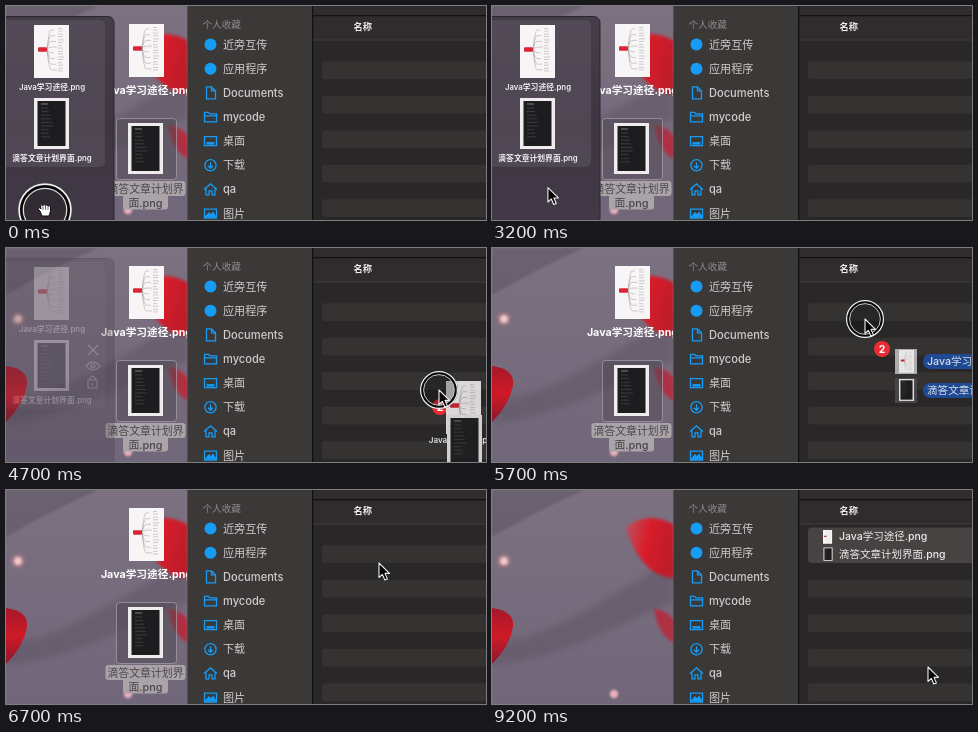
An HTML page for the animation above (9600 ms loop, 480 px wide and 214 px high).

```html
<!DOCTYPE html>
<html lang="zh-CN">
<head>
<meta charset="utf-8">
<title>Drag files into a folder</title>
<style>
html, body { margin: 0; width: 100%; height: 100%; overflow: hidden; background: #292727; }
svg { display: block; width: 480px; height: 214px; }
text { font-family: Inter, "Noto Sans CJK SC", "Noto Sans CJK", sans-serif; }
</style>
</head>
<body>
<svg id="stage" viewBox="0 0 480 214" xmlns="http://www.w3.org/2000/svg"></svg>
<script>
const LOOP = 9600, STEP = 100;
const FILE_A = 'Java学习途径.png', FILE_B = '滴答文章计划界面.png';
const BLUE = '#179cf5';

const rect = (x, y, w, h, fill, more = '') =>
  `<rect x="${x}" y="${y}" width="${w}" height="${h}" fill="${fill}" ${more}/>`;
const circle = (x, y, r, fill, more = '') =>
  `<circle cx="${x}" cy="${y}" r="${r}" fill="${fill}" ${more}/>`;
const path = (d, more = '') => `<path d="${d}" ${more}/>`;
const label = (x, y, size, s, fill, more = '') =>
  `<text x="${x}" y="${y}" font-size="${size}" fill="${fill}" ${more}>${s}</text>`;
const group = (id, body, more = '') => `<g id="${id}" ${more}>${body}</g>`;
const at = (x, y, body, scale = 1) =>
  `<g transform="translate(${x} ${y}) scale(${scale})">${body}</g>`;

// Mind-map page, 35 x 53
function mapPage() {
  let d = '';
  for (let i = 0; i < 8; i++) {
    const y = 5 + i * 5.7;
    d += `M13 24.5Q15 ${y} 17 ${y}H${20 + (i * 5) % 4}M24 ${y - 1.5}h${4 + i % 3}M24 ${y + 1}h5`;
  }
  return rect(0, 0, 35, 53, '#f7f5f5') +
    path(d, 'fill="none" stroke="#a39da0" stroke-width=".5"') +
    rect(4, 22.3, 9, 4.4, '#d92535', 'rx="1"');
}

// Dark task-list page, 35 x 51
function darkPage() {
  let lines = '';
  for (let i = 0; i < 9; i++) lines += `M7 ${10 + i * 3.6}h${7 + (i * 7) % 6}`;
  return rect(0, 0, 35, 51, '#eeecec') + rect(3.5, 3, 28, 45, '#1d1c1f') +
    path('M7 6h7', 'stroke="#999" stroke-width=".8"') +
    path(lines, 'stroke="#4a494e" stroke-width=".7"');
}

function desktop() {
  return rect(0, 0, 182, 214, 'url(#wall)') +
    path('M0 0H92Q50 18 0 47Z', 'fill="#645b69" opacity=".75" filter="url(#dot)"') +
    path('M0 152C45 150 70 135 182 69V112C120 136 85 163 0 176Z',
      'fill="#5b5262" opacity=".5" filter="url(#soft)"') +
    path('M134 38C145 27 163 24 182 35V88C162 88 144 71 134 38Z',
      'fill="url(#petal)" filter="url(#blur)"') +
    path('M162 119Q173 119 182 130V153Q166 145 162 119Z',
      'fill="#ba2637" opacity=".85" filter="url(#blur)"') +
    path('M0 118Q23 121 21 137Q18 156 0 174Z', 'fill="url(#leaf)"') +
    circle(12, 71, 6.5, '#d98f9b', 'opacity=".5" filter="url(#blur)"') +
    circle(12, 71, 3.8, '#f0c8c8', 'filter="url(#dot)"') +
    circle(122, 204, 4.2, '#e7aebb', 'filter="url(#dot)"');
}

function desktopFiles() {
  const bold = 'font-weight="700" text-anchor="middle"';
  const mid = 'font-weight="500" text-anchor="middle"';
  return at(123, 18, mapPage()) + label(140.5, 88, 10.7, FILE_A, '#fff', bold) +
    rect(110.5, 112.5, 60, 61, '#4d464f', 'fill-opacity=".45" stroke="#aaa2ae" stroke-opacity=".7" rx="3"') +
    at(122, 117, darkPage()) +
    rect(99.5, 175, 80, 15, '#aaa4a9', 'rx="3"') + rect(117, 188, 45, 15.5, '#aaa4a9', 'rx="3"') +
    label(139.5, 187, 10.9, FILE_B.slice(0, 7), '#4b464b', mid) +
    label(139.5, 200.5, 10.9, FILE_B.slice(7), '#4b464b', mid);
}

function shelf() {
  const mid = 'font-weight="600" text-anchor="middle"';
  const tools = path('M82 97l10 10m0-10l-10 10M80 118q6.500-8 14 0q-7 8-14 0ZM82 132h9v8h-9ZM84 132v-2q2.500-4 5 0v2',
      'fill="none" stroke="#cfcad3" stroke-width="1.1"') +
    circle(87, 118, 2, 'none', 'stroke="#cfcad3"') + circle(86.5, 136, 1, '#cfcad3');
  return rect(-8, 10.5, 116, 220, 'url(#shelf)', 'rx="6" stroke="#2c2630" stroke-width="1"') +
    rect(-8, 14, 107, 147, '#6b6270', 'fill-opacity=".38" rx="5"') +
    at(28, 19, mapPage()) + label(46, 84, 7.8, FILE_A, '#f1eef3', mid) +
    at(28, 92, darkPage()) + label(46, 155, 7.8, FILE_B, '#f1eef3', mid) +
    group('tools', tools);
}

function sidebar() {
  const names = ['近旁互传', '应用程序', 'Documents', 'mycode', '桌面', '下载', 'qa', '图片'];
  const icons = [
    circle(0, 0, 6, BLUE, 'stroke="none"'),
    circle(0, 0, 6, BLUE, 'stroke="none"'),
    path('M-4-6h5l4 4v8h-9ZM1-6v4h4'),
    path('M-6-4.500h4l1.500 1.500h6.500v8h-12ZM-6-1h12'),
    path('M-6-4.500h12v9h-12Z') + rect(-4, 1, 8, 2.5, BLUE, 'stroke="none"'),
    circle(0, 0, 5.6, 'none') + path('M0-3v6m-2.500-2.500l2.500 2.500l2.500-2.500'),
    path('M-6.500 0L0-5.500L6.500 0M-4.500-1v6.500h3v-4h3v4h3v-6.500'),
    path('M-6-4.500h12v9h-12Z') + path('M-5 3.500l3.500-4l2 2l2-2.500l3 4.500Z', `fill="${BLUE}"`)
  ];
  return rect(181, 0, 126, 214, '#3b3838') + rect(181, 0, 1, 214, '#514d50') +
    label(196.5, 21.5, 9.6, '个人收藏', '#8f8b8b', 'font-weight="500"') +
    names.map((name, i) => {
      const y = 38.5 + i * 24.15;
      return `<g transform="translate(204.500 ${y})" fill="none" stroke="${BLUE}" stroke-width="1.3">${icons[i]}</g>` +
        label(217, y + 4, 11.1, name, '#d0cccb', 'font-weight="500"');
    }).join('');
}

function fileList() {
  let stripes = '';
  for (let i = 0; i < 5; i++) stripes += rect(316, 55.3 + i * 34.5, 172, 17.6, '#353332', 'rx="3"');
  return rect(306, 0, 174, 214, '#292727') + rect(306, 0, 174, 34, '#302c2d') +
    rect(306, 9, 174, 1.3, '#131212') + rect(306, 33.5, 174, 1, '#413d3e') +
    rect(306, 0, 1.3, 214, '#121111') +
    label(347.5, 24.2, 9.3, '名称', '#eeebeb', 'font-weight="700"') + stripes;
}

function newRows() {
  return rect(316, 37.5, 172, 35.5, '#464342', 'rx="4"') +
    at(331, 40, mapPage(), .26) + at(331.5, 57.5, darkPage(), .26) +
    label(347, 50.3, 10.5, FILE_A, '#eeebeb', 'font-weight="500"') +
    label(347, 67.6, 10.5, FILE_B, '#eeebeb', 'font-weight="500"');
}

const badge = (x, y) => circle(x, y, 8, '#ed2b35') +
  label(x, y + 3.7, 10.5, '2', '#fff', 'font-weight="700" text-anchor="middle"');

function pageGhost() {
  return badge(1, 17) + '<g opacity=".85">' + at(7, -9, mapPage()) +
    label(24, 53, 8.1, FILE_A, '#fff', 'text-anchor="middle" font-weight="600"') +
    at(8, 25, darkPage()) + '</g>';
}

function rowGhost() {
  const row = (y, back, page, name) =>
    rect(30, y - 12, 22, 25, back) + at(34, y - 11, page, .43) +
    rect(58, y - 7, 116, 15, '#1f4c9c', 'rx="7"') +
    label(62, y + 4, 10.6, name, '#e6eefb', 'font-weight="500"');
  return `<g opacity=".92">${row(42, '#b9b6b6', mapPage(), FILE_A)}${row(71, '#4b4849', darkPage(), FILE_B)}</g>` +
    badge(17, 30);
}

const filter = (id, r) => `<filter id="${id}" x="-50%" y="-50%" width="200%" height="200%"><feGaussianBlur stdDeviation="${r}"/></filter>`;
const gradient = (id, dir, ...stops) => `<linearGradient id="${id}" ${dir}>` +
  stops.map((c, i) => `<stop offset="${i / (stops.length - 1)}" stop-color="${c}"/>`).join('') + '</linearGradient>';

const ARROW = 'M0 0V14.500L3.400 11.400L5.800 17L8.400 15.900L6 10.400H10.500Z';
const HAND = 'M-5 1L-7-1Q-7-3-5-2L-4-1L-4.500-4Q-3.500-6-2-4.500Q-1-6.500.5-4.500Q2-6 3-4Q5-5 5.500-3V1L4 6H-3Z';

const stage = document.getElementById('stage');
stage.innerHTML = '<defs>' +
  gradient('wall', 'x2="0" y2="1"', '#7c7180', '#776c7d', '#71677a') +
  gradient('shelf', 'x2="0" y2="1"', '#453d48', '#3d3641', '#433a47') +
  gradient('petal', 'y2=".3"', '#bd5060', '#d81f2b', '#bf1e2a') +
  gradient('leaf', 'x2="0" y2="1"', '#a7172b', '#cf1a26', '#8c182c') +
  filter('soft', 3) + filter('blur', 1.8) + filter('dot', .8) + '</defs>' +
  desktop() + group('files', desktopFiles()) + group('shelfBox', shelf()) +
  sidebar() + fileList() + group('rows', newRows()) +
  group('pages', pageGhost()) + group('rowDrag', rowGhost()) +
  group('ring', circle(0, 0, 17, '#000', 'fill-opacity=".25" stroke="#080808" stroke-width="4"') +
    circle(0, 0, 18.4, 'none', 'stroke="#f2f2f2" stroke-width="1.2"') +
    circle(0, 0, 15.4, 'none', 'stroke="#ddd" stroke-width=".9"')) +
  group('arrow', path(ARROW, 'fill="#050505" stroke="#eee" stroke-width="1.100" stroke-linejoin="round"')) +
  group('hand', path(HAND, 'fill="#fff" stroke="#111" stroke-width="1"') +
    path('M-2-4V0M.5-4V0M3-3.500V0', 'stroke="#333" stroke-width=".700"'));

const el = Object.fromEntries([...stage.querySelectorAll('g[id]')].map(g => [g.id, g]));

// [time, x, y] of the pointer tip
const ROUTE = [
  [0, 39, 204], [700, 39, 204], [1100, 46, 202], [1800, 46, 202], [2000, 45, 203],
  [2800, 45, 203], [3800, 76, 142], [4300, 76, 142], [4700, 433, 142], [5200, 424, 125],
  [5700, 373, 71], [6200, 373, 72], [6700, 373, 73], [8000, 373, 73],
  [8600, 435, 180], [8900, 435, 180], [9200, 436, 177], [LOOP, 436, 177]
];

const ramp = (t, a, b) => Math.max(0, Math.min(1, (t - a) / (b - a)));

function pointer(t) {
  const i = Math.max(1, ROUTE.findIndex(k => k[0] >= t));
  const [t0, x0, y0] = ROUTE[i - 1], [t1, x1, y1] = ROUTE[i];
  const p = ramp(t, t0, t1), e = p * p * (3 - 2 * p);
  return [x0 + (x1 - x0) * e, y0 + (y1 - y0) * e];
}

function place(g, [x, y], opacity, scale = 1) {
  g.setAttribute('transform', `translate(${x} ${y}) scale(${scale})`);
  fade(g, opacity);
}

function fade(g, opacity) {
  g.setAttribute('opacity', opacity);
  g.style.display = opacity > 0 ? '' : 'none';
}

function draw(time) {
  const t = Math.floor(time % LOOP / STEP) * STEP;
  const tip = pointer(t);
  const holding = t < 800, pressed = t >= 4000 && t < 6400;
  const dragging = t >= 4400 && t < 6300;

  fade(el.shelfBox, (1 - ramp(t, 4400, 4900)) ** 1.4);
  fade(el.tools, ramp(t, 3200, 3500));
  fade(el.files, 1 - ramp(t, 6700, 7000));
  fade(el.rows, t >= 6800 ? 1 : 0);

  const swap = ramp(t, 4900, 5200);
  place(el.pages, tip, dragging ? 1 - swap : 0);
  place(el.rowDrag, tip, dragging ? swap * (1 - ramp(t, 6000, 6300)) : 0);

  if (t < 400) place(el.ring, tip, t < 300 ? 1 : .4, t < 300 ? 1.41 : 1.65);
  else place(el.ring, tip, pressed ? 1 - ramp(t, 6200, 6400) : 0, 1 + .5 * ramp(t, 6200, 6400));
  place(el.hand, tip, holding ? 1 : 0);
  place(el.arrow, tip, holding ? 0 : 1);
}

const start = performance.now();
function tick() {
  draw(performance.now() - start);
  requestAnimationFrame(tick);
}
tick();
</script>
</body>
</html>
```
